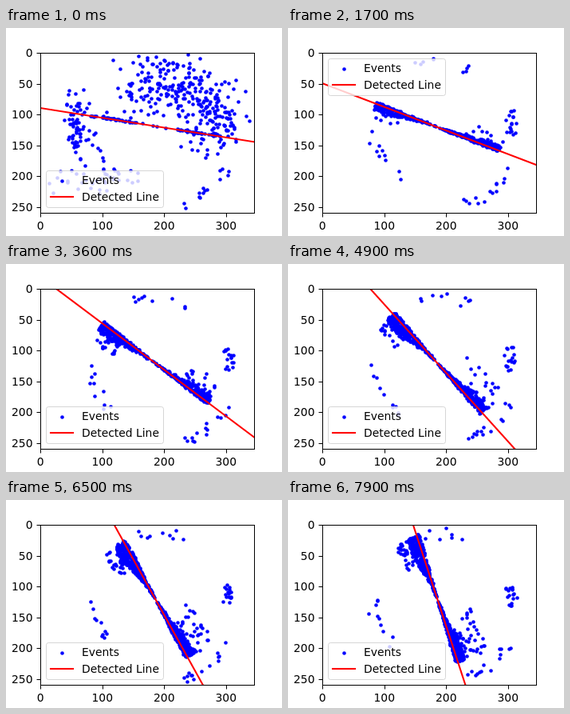
Recreate the animation shown at these times as an HTML page with a canvas. Size 346 by 260 pixels, loop 8 s.

```html
<!DOCTYPE html>
<html lang="en">
<head>
<meta charset="utf-8">
<title>Event line detection</title>
<style>
  html, body { margin: 0; width: 100%; height: 100%; overflow: hidden; background: #fff; }
  canvas, svg { position: absolute; left: 0; top: 0; }
  text { font: 13.89px "DejaVu Sans", sans-serif; }
</style>
</head>
<body>
<canvas id="plot" width="346" height="260"></canvas>
<svg width="346" height="260">
  <g id="axes" stroke="#000" fill="none">
    <rect x="43.5" y="31.5" width="268" height="200"/>
  </g>
  <g id="legend">
    <rect x="50.5" y="38.5" width="147" height="46" rx="2.8" fill="#fff" fill-opacity=".8" stroke="#ccc" stroke-opacity=".8"/>
    <circle cx="70.5" cy="51.5" r="2.3" fill="#00f"/>
    <path d="M56 71H84" stroke="#f00" stroke-width="2.08" stroke-linecap="square"/>
    <text x="95" y="55">Events</text>
    <text x="95" y="76">Detected Line</text>
  </g>
</svg>
<script>
const LEFT = 43.25, TOP = 31.2, WIDTH = 268.15, HEIGHT = 200.2;
const LOOP = 8000, STEP = 100, PIVOT_X = 187.3, REACH = 83;
const RAD = Math.PI / 180;
const ctx = document.getElementById('plot').getContext('2d');
const axes = document.getElementById('axes');
const legend = document.getElementById('legend');

// time and angle of the turning line
const turn = [[0, 9], [1700, 20.8], [2800, 29.7], [3600, 36.8], [4900, 47.85], [6500, 60.95], [7900, 71.87]];

// noise that dies away: centre, half size, dots
const clouds = [
  { x: 205, y: 76, w: 85, h: 44, n: 190 },
  { x: 262, y: 110, w: 50, h: 60, n: 85 },
  { x: 90, y: 122, w: 18, h: 52, n: 65 },
  { x: 120, y: 190, w: 80, h: 24, n: 36 }
];

// strays on a ring around the pivot: degrees, radius, dots
const arcs = [
  { from: -110, to: -60, r: 82, n: 9 },
  { from: -12, to: 6, r: 93, n: 17 },
  { from: 30, to: 70, r: 105, n: 14 },
  { from: 125, to: 182, r: 80, n: 10 }
];

function addTick(path, x, y, anchor, value) {
  axes.insertAdjacentHTML('beforeend', `<path d="${path}"/>
    <text x="${x}" y="${y}" text-anchor="${anchor}" fill="#000" stroke="none">${value}</text>`);
}
for (let v = 0; v <= 300; v += 100) {
  const x = LEFT + v * WIDTH / 346;
  addTick(`M${Math.round(x) + 0.5} 231.5v5`, x, 252, 'middle', v);
}
for (let v = 0; v <= 250; v += 50) {
  const y = TOP + v * HEIGHT / 260;
  addTick(`M43.5 ${Math.round(y) + 0.5}h-5`, 33.5, Math.round(y + 5), 'end', v);
}

function seeded(seed) {
  return () => {
    seed = (seed + 0x6D2B79F5) | 0;
    let n = Math.imul(seed ^ (seed >>> 15), 1 | seed);
    n = (n + Math.imul(n ^ (n >>> 7), 61 | n)) ^ n;
    return ((n ^ (n >>> 14)) >>> 0) / 4294967296;
  };
}

function angleAt(t) {
  const i = Math.max(1, turn.findIndex(k => k[0] >= t));
  const [t0, a0] = turn[i - 1], [t1, a1] = turn[i];
  return (a0 + (a1 - a0) * (t - t0) / (t1 - t0)) * RAD;
}

// dots sit on whole pixels
function dot(x, y) {
  ctx.beginPath();
  ctx.arc(Math.floor(x) + 0.5, Math.floor(y) + 0.5, 2.3, 0, 7);
  ctx.fill();
}

function draw(t) {
  const rand = seeded(t * 31 + 7);
  const spread = () => rand() + rand() - 1;
  const angle = angleAt(t);
  const pivotY = 122.8 + 1.2 * Math.min(1, t / 1700);
  const grow = 1 - Math.exp(-t / 2000);
  const trail = 16 * grow;
  const fade = Math.max(0, 1 - t / 1300) ** 1.5;

  const polar = (r, a) => dot(PIVOT_X + r * Math.cos(a), pivotY + r * Math.sin(a));
  // place a dot by its radius and its distance behind the turning line
  const behind = (r, lag, side) => polar(r, angle + side * Math.PI - lag / Math.max(r, 12));

  ctx.clearRect(0, 0, 346, 260);
  ctx.save();
  ctx.beginPath();
  ctx.rect(LEFT, TOP, WIDTH, HEIGHT);
  ctx.clip();
  ctx.fillStyle = '#00f';

  for (const { x, y, w, h, n } of clouds)
    for (let i = 0; i < Math.round(n * fade); i++) dot(x + w * spread(), y + h * spread());

  for (const { from, to, r, n } of arcs)
    for (let i = 0; i < n; i++) polar(r + 9 * spread(), (from + (to - from) * rand()) * RAD);

  // side 1 is the upper end of the bar, side 0 the lower
  for (let i = 0; i < 80 + 520 * grow; i++) {
    const side = i % 2;
    const r = REACH * rand() ** 0.6;
    const width = trail * (side ? 1 : 0.75) * Math.min(1, (r / 60) ** 1.5);
    behind(r, width * (rand() ** 1.3 - 0.18) + spread(), side);
  }
  for (let i = 0; i < t / 90; i++) {
    const side = i % 2;
    const r = REACH * (side ? 0.6 + 0.4 * rand() : 0.45 + 0.6 * rand());
    behind(r, trail * (0.5 + (side ? 1.4 : 2.2) * rand() ** 1.5), side);
  }

  const dx = 400 * Math.cos(angle), dy = 400 * Math.sin(angle);
  ctx.strokeStyle = '#f00';
  ctx.lineWidth = 2.08;
  ctx.beginPath();
  ctx.moveTo(PIVOT_X - dx, pivotY - dy);
  ctx.lineTo(PIVOT_X + dx, pivotY + dy);
  ctx.stroke();
  ctx.restore();

  const high = t >= 1200 && t < 2400;
  legend.setAttribute('transform', `translate(0 ${high ? 0 : 140})`);
}

let shown = -1;
function tick() {
  const t = Math.floor(performance.now() % LOOP / STEP) * STEP;
  if (t !== shown) draw(shown = t);
  requestAnimationFrame(tick);
}
tick();
</script>
</body>
</html>
```
